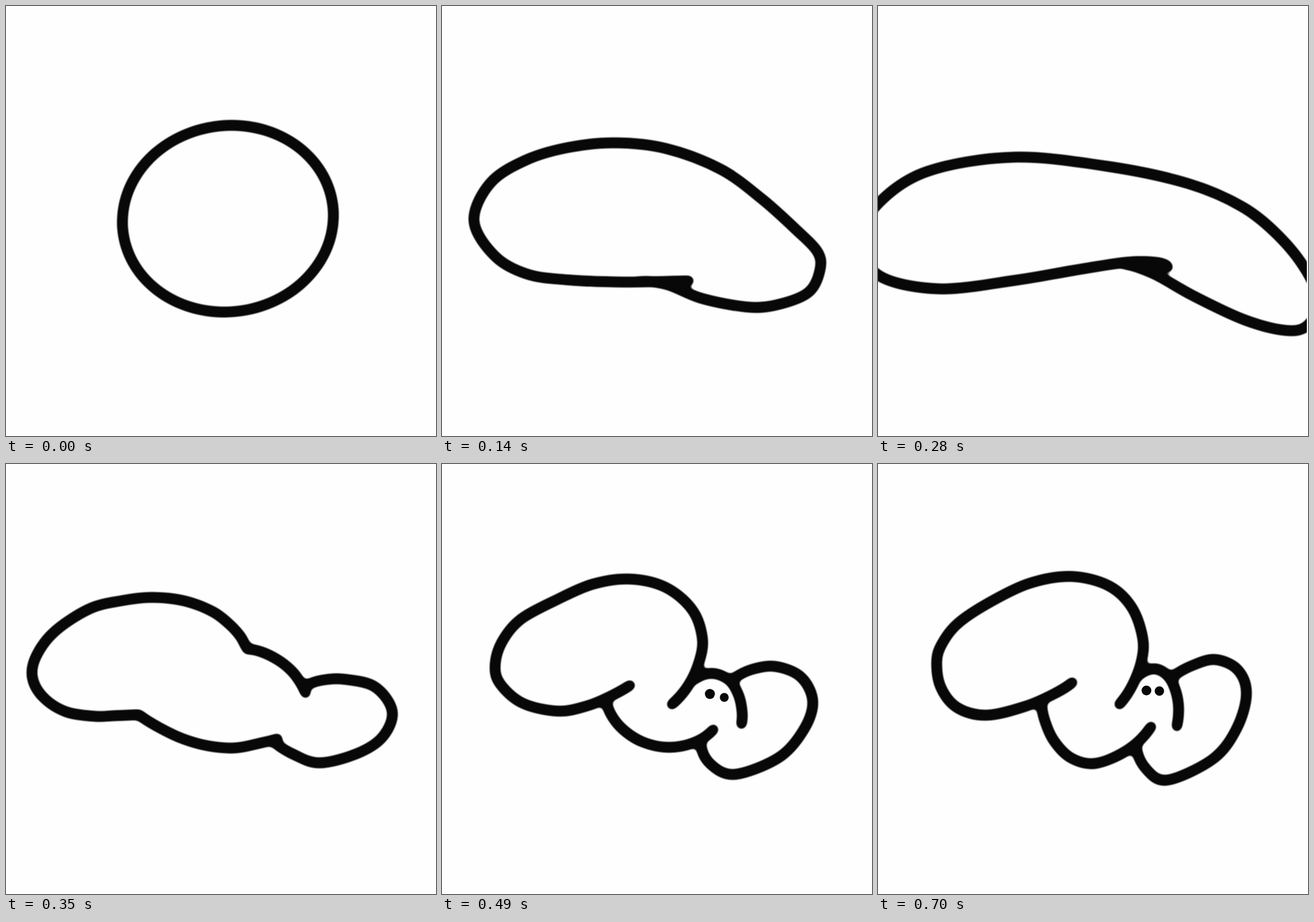
An HTML page that plays this animation: 748 px wide and 748 px high, repeating every 1050 ms.

```html
<!DOCTYPE html>
<html lang="en">
<head>
<meta charset="utf-8">
<title>Stretching blob</title>
<style>
  html, body { margin: 0; height: 100%; overflow: hidden; background: #fefefe; }
  svg { display: block; width: 100vw; height: 100vh; }
</style>
</head>
<body>
<svg viewBox="0 0 748 748">
  <!-- blur and sharpen the alpha, so that crossing lines melt together -->
  <filter id="melt" filterUnits="userSpaceOnUse" x="-60" y="100" width="870" height="540" color-interpolation-filters="sRGB">
    <feGaussianBlur stdDeviation="4"/>
    <feColorMatrix values="1 0 0 0 0  0 1 0 0 0  0 0 1 0 0  0 0 0 4 -1.5"/>
  </filter>
  <g filter="url(#melt)">
    <path id="line" fill="none" stroke="#080808" stroke-width="19" stroke-linecap="round" stroke-linejoin="round"/>
  </g>
  <circle class="eye" fill="#080808"/>
  <circle class="eye" fill="#080808"/>
  <rect x="746" width="2" height="748" fill="#fefefe"/>
</svg>
<script>
const STEP = 70, LOOP = 1050;
const nums = s => s.trim().split(/[\s,]+/).map(Number);
const pose = (eyes, ...lines) => ({ eyes: nums(eyes), lines: lines.map(nums) });
const noEyes = '0 0 0 0 0 0';

// A tilted ellipse, drawn a little past one full turn
function ring(cx, cy, a, b, tilt) {
  const c = Math.cos(tilt), s = Math.sin(tilt), pts = [];
  for (let k = 0; k < 23; k++) {
    const t = (72 + 18 * k) * Math.PI / 180;
    const x = a * Math.cos(t), y = b * Math.sin(t);
    pts.push(cx + x * c - y * s, cy + x * s + y * c);
  }
  return pts.join(' ');
}

const round = pose(noEyes, ring(386, 370, 184, 162, -0.14));

const bean = pose(noEyes,
  `429,478 370,479.5 300,480 220,476.5 150,467 93,436 55.5,374 84,308 146,268 220,246
   302,238 390,248 485,284 557,336 617,390 653,427 658,457 639,497 590,518 535,524
   453,509 390,484 340,480`);

const long = pose(noEyes,
  `504,454 484,446 430,446 340,460 240,477 105,492 0,468 -28,405 0,344 85,288
   235,263 400,279 540,309 635,350 700,403 746,462 766,515 746,557 706,564 635,545
   550,505 480,466 430,449`);

// Eyes are x, y, radius; lines are head, belly, tail and back
const pinched = pose('455 415 0 482 420 0',
  `231,436 210,437 185,438 155,439 104,431 64,405 45.5,370 53,333 85,291 145,252
   200,238 253,232 310,238 360,257 390,280 408,300 415,313 420,322`,
  `231,436 262,456 305,477 350,490 398,494 440,486 472,478`,
  `525,384 550,376 585,374 641,387 672,430 655,475 610,504 545,520 500,505 468,485`,
  `420,322 445,327 475,342 498,361 512,380 521,398`);

const curled = pose('466 400 8.7 491 406 7.7',
  `327,385 295,403 255,420 203,430 140,416 100,381 92.5,348 105,308 137,270 200,236
   262,209 325,200 388,214 435,253 453,303 447,345 428,386 400,418`,
  `286,408 293,434 315,462 350,484 395,493 440,484 472,462`,
  `508,373 540,357 580,352 624,370 645,412 630,461 587,510 510,540 467,522 450,486`,
  `440,374 470,364 500,376 516,402 522,430 521,452`);

const plump = pose('467 394 8.5 489.5 395 8.2',
  `338,380 308,399 258,421 190,437 138,424 109,388 102,345 110,315 137,279 190,243
   262,208 335,195.5 400,211 440,247 460,300 459,340 443,384 420,418`,
  `285,420 290,446 305,480 335,511 378,521 435,497 475,457`,
  `515,368 548,350 587,340 626,358 641,400 624,460 583,513 503,550 466,530 449,492`,
  `450,370 480,356 505,369 518,395 523,425 520,456`);

const mid = (a, b) => a.map((v, i) => (v + b[i]) / 2);
const between = (p, q) => ({
  eyes: mid(p.eyes, q.eyes),
  lines: p.lines.map((l, i) => mid(l, q.lines[i]))
});

const steps = [
  round, between(round, bean), bean, between(bean, long), long,
  pinched, between(pinched, curled), curled, plump, curled, plump
];

// Smooth open curve through all points
function curve(flat) {
  const p = [];
  for (let i = 0; i < flat.length; i += 2) p.push([flat[i], flat[i + 1]]);
  const beyond = (a, b, c) => a.map((v, i) => 3 * v - 3 * b[i] + c[i]);
  const n = p.length;
  const q = [beyond(p[0], p[1], p[2]), ...p, beyond(p[n - 1], p[n - 2], p[n - 3])];
  let d = 'M' + p[0];
  for (let i = 1; i < n; i++) {
    const [a, b, c, e] = q.slice(i - 1, i + 3);
    const out = b.map((v, k) => v + (c[k] - a[k]) / 6);
    const into = c.map((v, k) => v - (e[k] - b[k]) / 6);
    d += `C${out} ${into} ${c}`;
  }
  return d;
}

const line = document.getElementById('line');
const eyes = document.querySelectorAll('.eye');
let shown = -1;

function draw(now) {
  const i = Math.min(steps.length - 1, Math.floor((now % LOOP) / STEP));
  if (i !== shown) {
    shown = i;
    const s = steps[i];
    line.setAttribute('d', s.lines.map(curve).join(''));
    eyes.forEach((eye, k) => ['cx', 'cy', 'r'].forEach((name, j) =>
      eye.setAttribute(name, s.eyes[k * 3 + j])));
  }
}

const start = performance.now();
function tick() {
  draw(performance.now() - start);
  requestAnimationFrame(tick);
}
tick();
</script>
</body>
</html>
```
